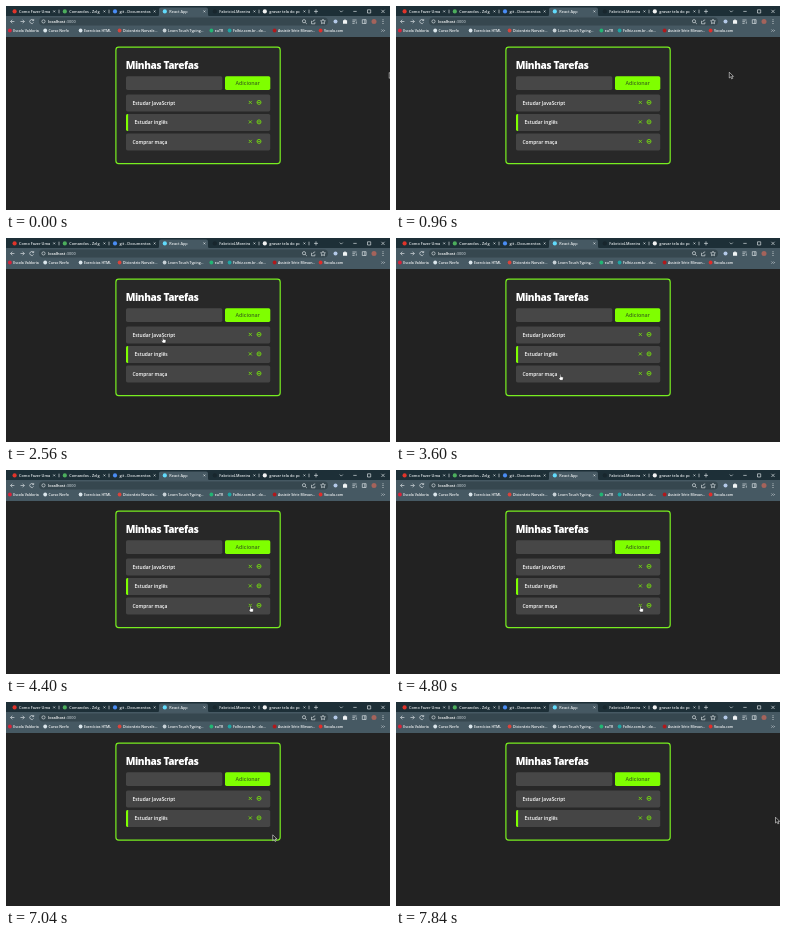
Recreate the animation shown at these times as an HTML page. Size 384x204 px, loop 8160 ms.

```html
<!DOCTYPE html>
<html lang="pt-BR">
<head>
<meta charset="utf-8">
<title>Minhas Tarefas</title>
<style>
html, body { margin: 0; width: 100%; height: 100%; overflow: hidden; background: #222; }
svg { display: block; width: 100%; height: 100%; }
text { font-family: "Open Sans", "Noto Sans", sans-serif; font-weight: 600; fill: #eee; }
.tab { font-size: 3.8px; fill: #e6eaec; }
.mark { font-size: 3.5px; fill: #f4f6f7; }
.url { font-size: 3.9px; fill: #fff; }
.task { font-size: 4.9px; fill: #fff; }
.title { font-size: 10px; font-weight: 800; letter-spacing: -.38px; fill: #fff; }
.thin { fill: none; stroke: #dfe5e8; stroke-width: .65; }
.green { fill: none; stroke: #72d512; stroke-width: .9; }
.cursor { fill: #fff; stroke: #111; stroke-width: .45; stroke-linejoin: round; }
#arrow { fill: #181818; stroke: #e4e4e4; stroke-width: .6; }
</style>
</head>
<body>
<svg viewBox="0 0 384 204" preserveAspectRatio="none">
  <rect width="384" height="204" fill="#222"/>
  <rect width="384" height="11" fill="#1d2f37"/>
  <rect y="10" width="384" height="21" fill="#465963"/>
  <path d="M151 10.5q2 0 2-2v-5q0-2 2-2h45q2 0 2 2v5q0 2 2 2z" fill="#465963"/>
  <rect x="33" y="11.6" width="289" height="8" rx="4" fill="#36474f"/>
  <g id="chrome"></g>

  <rect id="card" x="109.9" y="41.2" width="164.3" height="116.4" rx="2.8" fill="#282828" stroke="#78ee20" stroke-width="1.2"/>
  <text x="119.7" y="62.7" class="title">Minhas Tarefas</text>
  <rect x="120" y="70.3" width="96.3" height="13.6" rx="1.6" fill="#474747"/>
  <rect x="219" y="70.3" width="45.3" height="13.6" rx="1.6" fill="#7fff00"/>
  <text x="241.7" y="79" font-size="5.3" text-anchor="middle" style="fill:#3c6b16">Adicionar</text>
  <g id="tasks"></g>

  <g id="pointer">
    <path id="arrow" d="M0 0V5.8L1.4 4.6L2.4 6.7L3.4 6.2L2.4 4.2H4.2Z"/>
    <path id="hand" class="cursor" d="M-.5 .3Q0-.3 .5 .3V2.3L2.5 2.8Q3.1 3 3 3.8L2.6 6H-.3L-1.7 3.8Q-1.6 3-.5 3.7Z"/>
    <path id="beam" fill="none" stroke="#ddd" stroke-width=".65" d="M-1.3-3H1.3M0-3V3M-1.3 3H1.3"/>
  </g>
</svg>
<script>
const LOOP = 8160, STEP = 80, REMOVED = 5840;
const $ = id => document.getElementById(id);

function add(parent, tag, attrs, label) {
  const el = document.createElementNS("http://www.w3.org/2000/svg", tag);
  for (const key in attrs) el.setAttribute(key, attrs[key]);
  if (label) el.textContent = label;
  parent.appendChild(el);
  return el;
}

const chrome = $("chrome");
const say = (x, y, kind, label) => add(chrome, "text", { x, y, class: kind }, label);
const dot = (cx, cy, r, fill) => add(chrome, "circle", { cx, cy, r, fill });
const ring = (cx, cy, r) => add(chrome, "circle", { cx, cy, r, class: "thin" });
const line = d => add(chrome, "path", { d, class: "thin" });
const cross = (x, y, r) => `M${x - r} ${y - r}l${2 * r} ${2 * r}m0 ${-2 * r}l${-2 * r} ${2 * r}`;

// Tabs: icon centre, icon colour, title
[
  [8.6, "#e0342a", "Como Fazer Uma"],
  [58.8, "#4cae5c", "Comandos - Zelg"],
  [109, "#4a8df5", "git - Documentos"],
  [158.8, "#61dafb", "React App"],
  [208.8, "#18262d", "FabricioLMoreira"],
  [258.8, "#f2f2f2", "gravar tela do pc"]
].forEach(([x, color, title]) => {
  dot(x, 5.4, 2.1, color);
  say(x + 4.5, 6.8, "tab", title);
  line(cross(x + 39.6, 5.4, .9));
});
[53, 103, 253, 303].forEach(x => line(`M${x} 3.7v3.6`));
line("M308 5.4h4M310 3.4v4M333.8 4.6l1.5 1.5l1.5-1.5M347.3 5.4h3.4M361.5 3.8h3.2v3.2h-3.2z" + cross(377, 5.4, 1.6));

// Toolbar
line("M8.4 15.5H4.6M6.3 13.7L4.6 15.5l1.7 1.8M14.5 15.5h3.8M16.6 13.7l1.7 1.8l-1.7 1.8");
line("M27.5 14.4a2 2 0 1 0 .1 2M27.7 13v1.6h-1.6");
ring(37.5, 15.4, 1.6);
say(42.2, 16.9, "url", "localhost");
say(59.8, 16.9, "url", ":3000").style.fill = "#b2bdc3";
ring(298, 15.2, 1.6);
line("M299.2 16.4l1.6 1.5M305.5 14.8v3h3.4v-1.6M306.7 15.9q.4-2 2.5-2");
line("M317 13.2l.7 1.5l1.7.2l-1.2 1.1l.3 1.7l-1.5-.8l-1.5.8l.3-1.7l-1.2-1.1l1.7-.2z");
dot(329.5, 15.6, 2, "#b4c9e8");
add(chrome, "path", { d: "M337 14.2h1.1q.9-1.8 1.8 0h1.2v3.6H337z", fill: "#f1f4f5" });
line("M346.4 14h4.2M346.4 15.7h2.6M346.4 17.4h2.2M350.3 15.5v2.2M356.3 13.7h3.8v3.8h-3.8zM358.8 13.7v3.8");
dot(368, 15.6, 2.5, "#a4635b");
[13.7, 15.6, 17.5].forEach(y => dot(377, y, .5, "#e3e8ea"));

// Bookmarks
[
  [7.3, "#d8233a", "Escola Valdoria"],
  [42.6, "#dbe6ec", "Curso Nerfo"],
  [78, "#dbe6ec", "Exercícios HTML"],
  [117, "#d9443c", "Dicionário Norvale..."],
  [162, "#c8d2d7", "Learn Touch Typing..."],
  [208.8, "#22b573", "euTR"],
  [227, "#1fa6a4", "Folhiz.com.br - do..."],
  [272, "#b0191c", "Assistir Série Mirvan..."],
  [318, "#e02d2a", "Vocala.com"]
].forEach(([x, color, label]) => {
  dot(x - 3.4, 24.5, 1.9, color);
  say(x, 25.7, "mark", label);
});
line("M375.5 23.6l1 1l-1 1M377.5 23.6l1 1l-1 1");

// Task rows
const rows = ["Estudar JavaScript", "Estudar inglês", "Comprar maça"].map((label, i) => {
  const row = add($("tasks"), "g", { transform: `translate(120 ${88.4 + 19.5 * i})` });
  add(row, "rect", { width: 144.2, height: 17, rx: 1.7, fill: "#454545" });
  const marked = i === 1;
  if (marked) add(row, "path", { d: "M2.1 0H1.6Q0 0 0 1.6V15.4Q0 17 1.6 17H2.1Z", fill: "#7fff00" });
  add(row, "text", { x: marked ? 8.6 : 6.5, y: 10.5, class: "task" }, label);
  add(row, "path", { d: cross(124.3, 8, 1.5), class: "green" });
  add(row, "circle", { cx: 133, cy: 8, r: 2, class: "green" });
  add(row, "path", { d: "M131.4 8h3.2", class: "green" });
  return row;
});

// Pointer path: time, x, y
const path = [
  [0, 383.2, 66.5], [720, 383.2, 66.5], [1120, 300, 66], [1600, 201, 73],
  [1680, 199.3, 76.5], [2080, 178, 88], [2480, 157, 99], [2560, 157, 99],
  [2960, 158, 118], [3360, 164, 136], [3600, 164.3, 136.3], [3680, 167, 136.5],
  [4320, 243, 136.5], [4400, 244.5, 136], [6880, 244.5, 136],
  [7280, 300, 128], [7680, 372, 117], [7760, 372, 117], [7840, 379.5, 115.2], [LOOP, 379.5, 115.2]
];

function place(t) {
  const i = Math.max(1, path.findIndex(p => p[0] >= t));
  const [t0, x0, y0] = path[i - 1], [t1, x1, y1] = path[i];
  const u = (t - t0) / (t1 - t0);
  return [x0 + (x1 - x0) * u, y0 + (y1 - y0) * u];
}

function draw(now) {
  const t = Math.floor((now % LOOP) / STEP) * STEP;
  const removed = t >= REMOVED;
  const [x, y] = place(t);
  rows[2].style.display = removed ? "none" : "";
  $("card").setAttribute("height", removed ? 96.9 : 116.4);

  const within = (l, r, top, bottom) => x > l && x < r && y > top && y < bottom;
  const overRow = [0, 1, 2].some(i => !(removed && i === 2) &&
    within(120, 264, 88.4 + 19.5 * i, 105.4 + 19.5 * i));
  const kind = within(120, 216, 70, 84) ? "beam"
    : overRow || within(219, 264, 70, 84) ? "hand" : "arrow";
  ["arrow", "hand", "beam"].forEach(id => $(id).style.display = id === kind ? "" : "none");
  $("pointer").setAttribute("transform", `translate(${x} ${y})`);
}

const start = performance.now();
function tick() {
  draw(performance.now() - start);
  requestAnimationFrame(tick);
}
tick();
</script>
</body>
</html>
```
